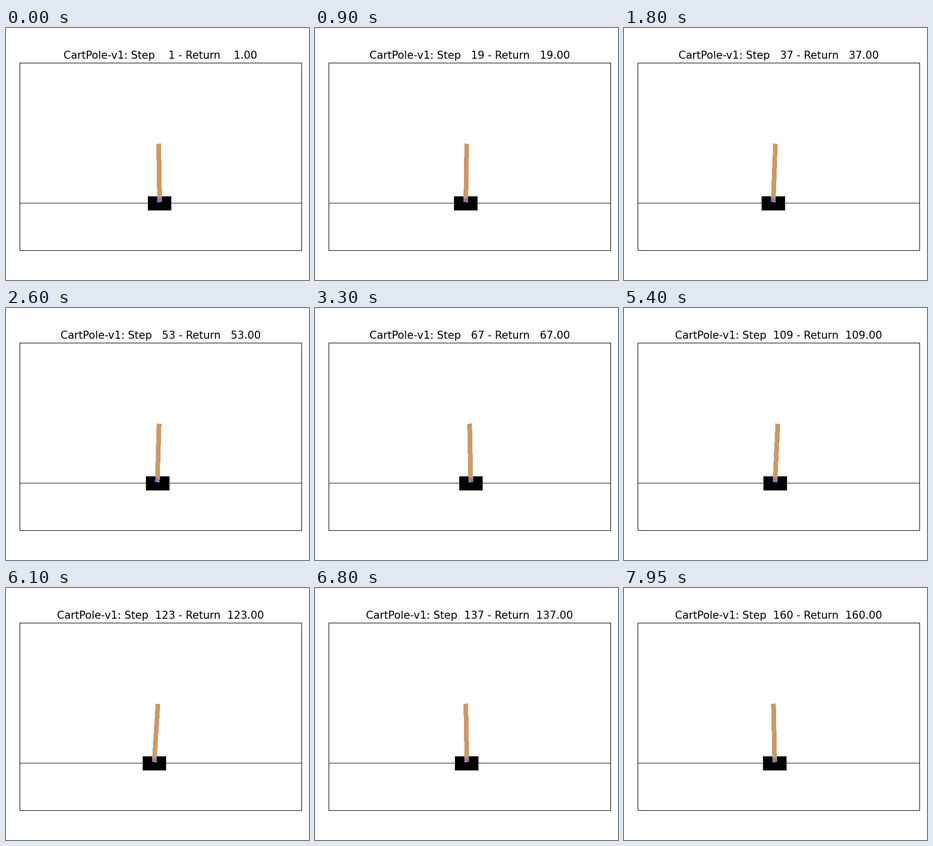
A matplotlib script that plays this animation: 600 px wide and 500 px high, repeating every 8000 ms.

```python
import numpy as np
import matplotlib.pyplot as plt
from matplotlib.animation import FuncAnimation

STEPS, INTERVAL = 160, 50
WIDTH, HEIGHT, SCALE = 600, 400, 125

# Cart-pole constants
TAU, GRAVITY, MASS, POLE_MASS, HALF_LEN = 0.02, 9.8, 1.1, 0.1, 0.5

# Scene sizes in pixels
CART_W, CART_H, CART_Y = 50, 30, 100
POLE_W, POLE_LEN = 10, 125
AXLE_Y = CART_Y + CART_H / 4

BLACK, WOOD, AXLE = (0, 0, 0), (0.8, 0.6, 0.4), (0.5, 0.5, 0.8)

# step index: cart position, pole angle (None leaves the angle free)
KEYS = {
    0: (-0.0166, -0.0165),
    25: (-0.104, None),
    36: (-0.088, 0.037),
    66: (0.021, -0.0202),
    84: (0.120, -0.107),
    108: (-0.0586, 0.0477),
    119: (-0.090, None),
    125: (-0.112, None),
    136: (-0.0462, -0.0182),
    153: (-0.047, None),
    159: (-0.0659, -0.0202),
}


def solve_path():
    """Least-effort push sequence that carries the cart-pole through KEYS."""
    k = 1 / (HALF_LEN * (4 / 3 - POLE_MASS / MASS))
    c = POLE_MASS * HALF_LEN / MASS
    a = np.eye(4)
    a[0, 1] = a[2, 3] = TAU
    a[3, 2] = TAU * k * GRAVITY
    a[1, 2] = -c * a[3, 2]
    b = TAU / MASS * np.array([0, 1 + c * k, 0, -k])

    # every state as a linear map of (start state, pushes)
    maps = np.zeros((STEPS, 4, STEPS + 3))
    maps[0, :, :4] = np.eye(4)
    for n in range(STEPS - 1):
        maps[n + 1] = a @ maps[n]
        maps[n + 1, :, 4 + n] += b

    rows, goals = [], []
    for n, (pos, angle) in KEYS.items():
        rows.append(maps[n, 0])
        goals.append(pos)
        if angle is not None:
            rows.append(maps[n, 2])
            goals.append(angle)
    plan = np.linalg.lstsq(np.array(rows), np.array(goals), rcond=None)[0]
    return maps[:, 0] @ plan, maps[:, 2] @ plan


POS, ANGLE = solve_path()
PX = np.arange(WIDTH)[None, :] + 0.5
PY = np.arange(HEIGHT)[:, None] + 0.5


def render(n):
    """Hard-edged scene: cart, pole, axle, track."""
    scene = np.ones((HEIGHT, WIDTH, 3))
    dx = PX - (WIDTH / 2 + SCALE * POS[n])
    dy = PY - AXLE_Y
    sin, cos = np.sin(ANGLE[n]), np.cos(ANGLE[n])
    along, across = dx * sin + dy * cos, dx * cos - dy * sin
    r = POLE_W / 2

    scene[(abs(dx) < CART_W / 2) & (abs(PY - CART_Y) < CART_H / 2)] = BLACK
    scene[(abs(across) < r) & (along > -r) & (along < POLE_LEN - r)] = WOOD
    scene[dx**2 + dy**2 < r**2] = AXLE
    scene[CART_Y] = BLACK
    return scene


fig = plt.figure(figsize=(6, 5), dpi=100, facecolor="white")
ax = fig.add_axes([27 / 600, 59 / 500, 558 / 600, 372 / 500])
ax.set_xticks([])
ax.set_yticks([])
image = ax.imshow(render(0), origin="lower", aspect="auto",
                  extent=(0, WIDTH, 0, HEIGHT))
title = ax.set_title("", fontsize=15, fontfamily="DejaVu Sans")


def update(n):
    image.set_data(render(n))
    step = n + 1
    title.set_text(f"CartPole-v1: Step {step:4d} - Return {step:7.2f}")
    return image, title


anim = FuncAnimation(fig, update, frames=STEPS, interval=INTERVAL,
                     init_func=lambda: update(0), repeat=True)
plt.show()
```
